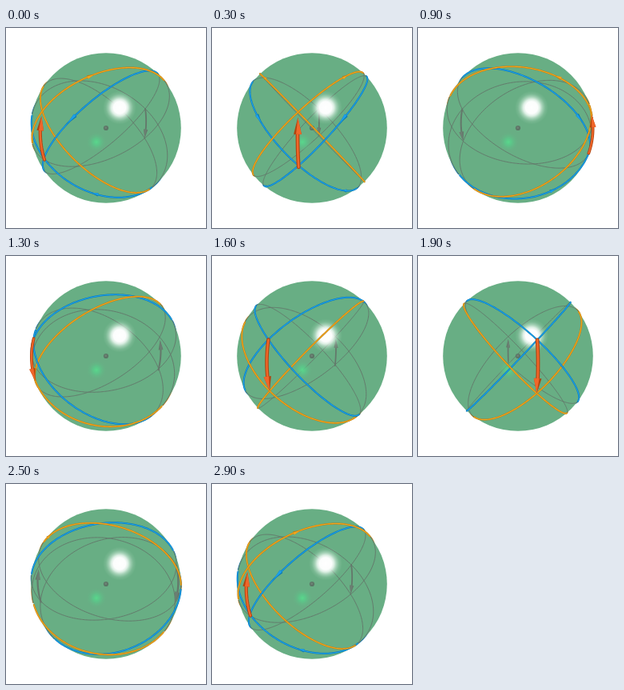
Animation, 250 px wide and 250 px high, one loop 3100 ms. Source, as an HTML page with a canvas:

```html
<!DOCTYPE html>
<html lang="en">
<head>
<meta charset="utf-8">
<title>Great circles on a turning sphere</title>
<style>
html, body { margin: 0; width: 100%; height: 100%; overflow: hidden; background: #fff; }
canvas { display: block; width: 250px; height: 250px; }
</style>
</head>
<body>
<canvas id="stage"></canvas>
<script>
const canvas = document.getElementById('stage');
const ctx = canvas.getContext('2d');
const dpr = window.devicePixelRatio || 1;
canvas.width = canvas.height = 250 * dpr;

const RAD = Math.PI / 180;
const CENTER = 125, RADIUS = 93.8;
const DISTANCE = 2.9, FOCAL = RADIUS * Math.sqrt(DISTANCE ** 2 - 1);
const TILT = 6.4 * RAD;          // camera elevation
const INCLINE = 46.4 * RAD;      // steepness of the great circles
const CROSSING = 15;             // latitude where circles of one colour meet
const NODE = Math.acos(Math.tan(CROSSING * RAD) / Math.tan(INCLINE)) / RAD;
const STEP_MS = 100, STEPS = 29, LOOP_MS = 3100;

const BLUE = { dark: '#0a78b4', light: '#1ca0ea' };
const ORANGE = { dark: '#bb7f14', light: '#f5a51c' };
const RED = { dark: '#b0440f', light: '#f0662a' };
const GRAY = { dark: '#64786b', light: '#6b7f72' };

// Longitude and latitude in degrees to stage coordinates.
function project(lon, lat) {
  const a = lon * RAD, b = lat * RAD;
  const x = Math.sin(a) * Math.cos(b), up = Math.sin(b), out = Math.cos(a) * Math.cos(b);
  const y = up * Math.cos(TILT) - out * Math.sin(TILT);
  const z = out * Math.cos(TILT) + up * Math.sin(TILT);
  const scale = FOCAL / (DISTANCE - z);
  return { x: CENTER + x * scale, y: CENTER - y * scale, scale, front: z > 1 / DISTANCE };
}

const latitudeOn = (peak, lon) =>
  Math.atan(Math.tan(INCLINE) * Math.cos((lon - peak) * RAD)) / RAD;

function strokeCircle(peak, front, color, width) {
  ctx.beginPath();
  let last = null;
  for (let lon = 0; lon <= 360; lon += 1.5) {
    const p = project(lon, latitudeOn(peak, lon));
    if (p.front === front) {
      if (last) ctx.lineTo(p.x, p.y);
      else ctx.moveTo(p.x, p.y);
    }
    last = p.front === front ? p : null;
  }
  ctx.strokeStyle = color;
  ctx.lineWidth = width;
  ctx.stroke();
}

function cone(base, tip, halfWidth, paint) {
  const dx = tip.x - base.x, dy = tip.y - base.y, len = Math.hypot(dx, dy) || 1;
  const nx = -dy / len * halfWidth, ny = dx / len * halfWidth;
  const fillSide = (k, color) => {
    ctx.beginPath();
    ctx.moveTo(base.x + nx, base.y + ny);
    ctx.lineTo(tip.x, tip.y);
    ctx.lineTo(base.x + nx * k, base.y + ny * k);
    ctx.fillStyle = color;
    ctx.fill();
  };
  fillSide(-1, paint.dark);
  fillSide(-0.4, paint.light);
}

function circleHead(peak, lon, turn, paint) {
  const at = d => project(lon + d, latitudeOn(peak, lon + d));
  const base = at(-turn * 2.5), tip = at(turn * 2.5);
  if (base.front && tip.front) cone(base, tip, base.scale * 0.019, paint);
}

function arrow(lon, from, to, front, paint) {
  if (project(lon, (from + to) / 2).front !== front) return;
  const neck = to - Math.sign(to - from) * 9;
  const line = (color, width) => {
    ctx.beginPath();
    for (let i = 0; i <= 12; i++) {
      const p = project(lon, from + (neck - from) * i / 12);
      ctx.lineTo(p.x, p.y);
    }
    ctx.strokeStyle = color;
    ctx.lineWidth = width;
    ctx.stroke();
  };
  const base = project(lon, neck);
  const gray = paint === GRAY;
  line(paint.dark, base.scale * (gray ? 0.026 : 0.036));
  if (!gray) line(paint.light, base.scale * 0.019);
  cone(base, project(lon, to), base.scale * 0.037, paint);
}

function disc(x, y, r, fill) {
  ctx.beginPath();
  ctx.arc(x, y, r, 0, 2 * Math.PI);
  ctx.fillStyle = fill;
  ctx.fill();
}

function glow(x, y, r, stops) {
  const g = ctx.createRadialGradient(x, y, 0, x, y, r);
  stops.forEach(([at, color]) => g.addColorStop(at, color));
  disc(x, y, r, g);
}

function draw(lon) {
  ctx.setTransform(dpr, 0, 0, dpr, 0, 0);
  ctx.fillStyle = '#fff';
  ctx.fillRect(0, 0, 250, 250);
  ctx.lineCap = ctx.lineJoin = 'round';

  const circles = [-1, 1].flatMap(side => [
    { peak: lon + side * (180 - NODE), paint: BLUE },
    { peak: lon + side * NODE, paint: ORANGE }
  ]);
  const arrows = (front, paint) => {
    arrow(lon, -CROSSING - 1, CROSSING - 3, front, paint);
    arrow(lon + 180, CROSSING, -CROSSING, front, paint);
  };

  // Far-side tubes peek out past the outline before the sphere covers them.
  circles.forEach(c => strokeCircle(c.peak, false, c.paint.dark, 2));
  arrows(false, RED);
  disc(CENTER, CENTER, RADIUS, '#68ae84');

  circles.forEach(c => strokeCircle(c.peak, false, GRAY.dark, 0.95));
  arrows(false, GRAY);
  disc(CENTER, CENTER, 3.1, '#5c7566');
  disc(CENTER - 0.4, CENTER - 0.5, 1.6, '#6c8073');
  glow(113, 142.5, 13, [[0, 'rgba(88,218,140,.95)'], [0.35, 'rgba(88,204,138,.7)'], [1, 'rgba(104,174,132,0)']]);
  glow(142, 99.5, 21, [[0, '#fff'], [0.36, 'rgba(255,255,255,.98)'], [0.5, 'rgba(250,255,252,.8)'],
    [0.65, 'rgba(235,250,240,.45)'], [0.82, 'rgba(215,240,224,.15)'], [1, 'rgba(200,230,210,0)']]);

  circles.forEach(c => {
    strokeCircle(c.peak, true, c.paint.dark, 2.1);
    strokeCircle(c.peak, true, c.paint.light, 1.1);
  });
  [-1, 1].forEach(side => {
    circleHead(lon + side * (180 - NODE), lon + side * 25, -side, BLUE);
    circleHead(lon - side * (180 - NODE), lon + side * 36, -side, BLUE);
    circleHead(lon + side * NODE, lon + side * 34, side, ORANGE);
  });
  arrows(true, RED);
}

function tick() {
  const step = Math.min(STEPS, Math.floor(performance.now() % LOOP_MS / STEP_MS));
  draw(-45 + 360 * step / STEPS);
  requestAnimationFrame(tick);
}
tick();
</script>
</body>
</html>
```
